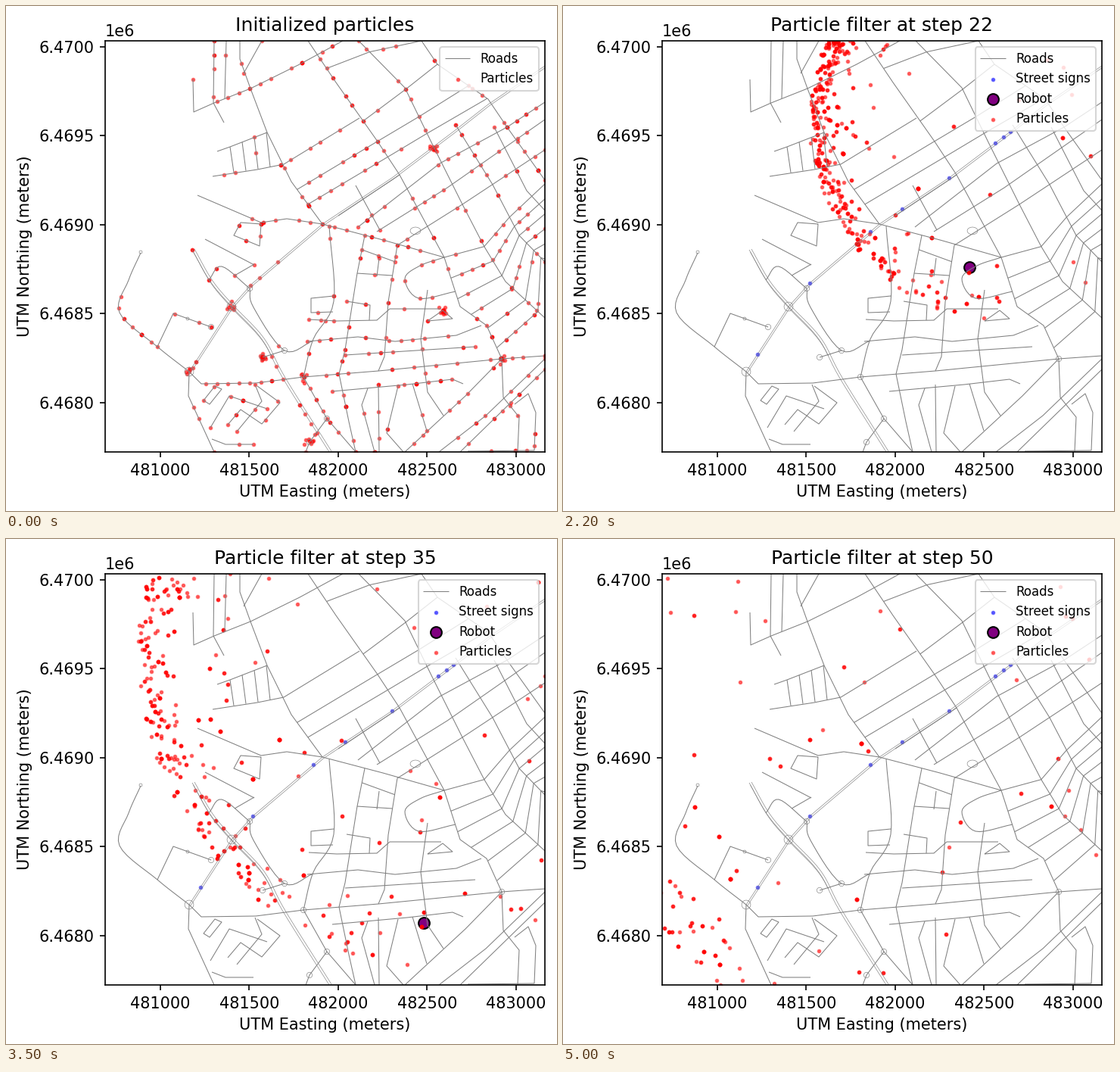
A matplotlib script for the animation above (5100 ms loop, 728x667 px).

```python
import numpy as np
import matplotlib.pyplot as plt
from matplotlib.animation import FuncAnimation
from matplotlib.collections import LineCollection

W, H, DPI = 728, 667, 150
LEFT, RIGHT, TOP, BOTTOM = 131, 712, 46, 589
SCALE = 0.2349          # pixels per metre
STEPS = 51
SPEED = 11.6            # pixels per step
START = (586, 155)


def utm(points):
    """Stage pixels to UTM metres."""
    p = np.asarray(points, float)
    return np.column_stack([481000 + (p[:, 0] - 204) / SCALE,
                            6470000 - (p[:, 1] - 54) / SCALE])


def at(road, t):
    """Points at the fractions t of a road's length."""
    p = np.asarray(road, float)
    s = np.append(0, np.cumsum(np.hypot(*np.diff(p, axis=0).T)))
    t = np.asarray(t) * s[-1]
    return np.column_stack([np.interp(t, s, p[:, 0]), np.interp(t, s, p[:, 1])])


def links(a, b, ta, tb):
    """Straight streets between matching fractions of two roads."""
    return list(np.stack([at(a, ta), at(b, tb)], axis=1))


def bend(*points):
    """Smooth curve through the points (Catmull-Rom)."""
    p = np.array(points, float)
    p = np.vstack([2 * p[0] - p[1], p, 2 * p[-1] - p[-2]])
    u = np.linspace(0, 1, 8)[:, None]
    return np.vstack([b + u * (c - a) / 2 + u**2 * (a - 2.5 * b + 2 * c - d / 2)
                      + u**3 * (1.5 * (b - c) + (d - a) / 2)
                      for a, b, c, d in zip(p, p[1:], p[2:], p[3:])])


def ring(center, r):
    a = np.linspace(0, 2 * np.pi, 17)
    return np.column_stack([center[0] + r * np.cos(a), center[1] + r * np.sin(a)])


# Junctions
circus, star, slip, mouth, elbow = (242, 483), (298, 397), (322, 373), (271, 424), (368, 455)
spur, gate, fork, foot, corner = (339, 464), (393, 490), (424, 545), (401, 576), (655, 466)
hill, brook, ridge = (418, 288), (579, 332), (323, 109)

# Through roads
trunk = [circus, star, (326, 366), hill, (510, 227), (591, 166), (637, 130), (712, 79)]
highway = bend((246, 322), (270, 364), star, (338, 440), (366, 492), (427, 589))
diag_a = [(309, 46), (309, 70), ridge, (345, 167), (377, 232), hill]
diag_b = [(399, 46), (436, 101), (491, 179), (520, 223), brook]
diag_c = [(466, 46), (527, 108), (562, 180), (603, 262), (632, 318), (660, 364), (712, 412)]
diag_d = [(549, 46), (570, 77), (637, 123), (662, 160), (712, 230)]
diag_e = [brook, (600, 397), (635, 422), corner]
arc_f = [(594, 157), (643, 236), (678, 303), (712, 338)]
arc_g = [(645, 160), (688, 244), (712, 270)]
cross = [hill, (498, 309), brook]
south_road = [circus, (258, 499), (330, 498), gate, (492, 482), corner, (712, 462)]
col_a = bend((427, 291), (433, 390), (406, 440), gate)
col_b = [(474, 303), (464, 353), (448, 454), (440, 486), (453, 549), (462, 589)]
col_c = [(517, 316), (505, 391), (500, 463), (492, 482)]
col_d = [(557, 375), (548, 440), (557, 510), (578, 541)]
streets = [diag_a, diag_b, diag_c, diag_d, diag_e, arc_f, arc_g, cross,
           south_road, col_a, col_b, col_c, col_d]

# North west
streets += [[(247, 97), (248, 140), (275, 128), ridge, (388, 77), (445, 46)],
            [(275, 46), (274, 128), (288, 154)], [(291, 46), (289, 122)],
            [(338, 46), (314, 89)],
            [(273, 225), (332, 216), (367, 209), (467, 148)],
            [(279, 192), (296, 186), (345, 167)]]
streets += [[(x, 186 - .4 * (x - 296)), (x + 5, 220 - .15 * (x - 296))]
            for x in range(296, 345, 16)]

# North: side streets between the diagonals
streets += links(diag_a, diag_b, [.79, .88], [.477, .55])
streets += links(diag_b, diag_c, [.13, .38, .477, .55], [.046, .2, .29, .345])
streets += links(diag_c, diag_d, [.046, .2, .29, .345], [0, .15, .35, .47])
streets += [[(465, 292), (573, 208), (662, 160), (712, 127)],
            [(490, 298), (583, 240), (712, 150)],
            [(517, 316), (603, 262), (712, 190)],
            [(439, 277), (520, 223)], [(462, 237), (494, 296)]]

# East: spokes across the arcs
t = np.linspace(0, .9, 6)
edge = [(712, 235), (712, 345)]
streets += list(np.stack([at(diag_e, t), at(diag_c, .72 + .28 * t),
                          at(arc_f, .65 + .35 * t), at(edge, t)], axis=1))
streets += [bend(brook, (547, 343), (527, 360), (545, 386), (594, 377)),
            [(557, 416), (577, 402), (590, 413), (557, 416)]]

# West
streets += [[(253, 250), (337, 286), (371, 281), hill],
            [(337, 288), (310, 286), (301, 303), (335, 317), (337, 288)],
            [(263, 308), (328, 342)],
            bend((178, 326), (162, 362), (150, 405), (200, 450), circus),
            [(200, 450), (221, 406), mouth],
            bend((268, 362), (285, 344), slip), [(302, 356), (328, 341)],
            bend(slip, (327, 398), elbow, (406, 442)), [elbow, spur]]

# South west
streets += [[circus, (241, 515), (275, 589)],
            [(261, 521), (276, 502), (285, 506), (269, 526), (261, 521)],
            [(270, 557), (295, 515), (345, 532)],
            [(272, 572), (290, 579), (327, 579)],
            [(293, 553), (310, 533), (338, 552), (362, 524), (332, 502)],
            [(305, 562), (338, 522), (329, 500)],
            [gate, fork, (462, 589)], [fork, foot, (396, 589)]]

# Centre
streets += links(col_b, col_c, [.066, .175], [.13, .24])
streets += [[(433, 383), (403, 386), (403, 405), (432, 404)],
            [(400, 414), (437, 416), (490, 415), (507, 400), (575, 400)],
            [(398, 443), (465, 437), (514, 443), (595, 435), (628, 422)],
            [(448, 461), (620, 450)],
            [(493, 333), (490, 357)], [(450, 390), (481, 395), (480, 415)],
            [(431, 509), (530, 500), (590, 493), (604, 499)]]

# South
streets += [[(478, 505), (470, 527), (487, 589)], [(492, 500), (493, 589)],
            [(518, 502), (503, 564), (525, 589)], [(537, 499), (556, 561)],
            [(527, 589), (607, 515), corner], [(572, 589), (634, 541), (712, 466)],
            [(600, 589), (712, 480)], [corner, (657, 517), (678, 543), (676, 589)],
            [(672, 526), (690, 512), (700, 537), (698, 587), (610, 588)]]

hubs = [circus, star, slip, mouth, elbow, spur, gate, fork, foot, corner]
main_roads = [trunk, np.add(trunk, (1.5, 1.8)), highway, highway + (3, -1),
              highway[:28] + (1.5, 3)]
main_roads += [ring(h, 6 if h in (circus, star) else 3.7) for h in hubs]
main_roads += [ring((178, 325), 2), ring((240, 413), 2),
               ring((541, 297), 7) * (1, .7) + (0, 89)]

signs = at(trunk, [.044, .231, .399, .48, .6, .722, .744, .762])

# Robot way points: step, x, y
route = np.array([(0, 590, 166), (7, 519, 222), (14, 555, 295), (18, 517, 320),
                  (20, 513, 341), (22, 537, 345), (24, 549, 369), (30, 548, 440),
                  (39, 556, 561), (42, 559, 602)])

rng = np.random.default_rng(7)


def road_nodes():
    """Points about 14 pixels apart along every road."""
    nodes = []
    for road in streets + [trunk[:4], highway]:
        length = np.hypot(*np.diff(road, axis=0).T).sum()
        nodes.append(at(road, np.linspace(0, 1, max(2, int(length / 14)))))
    return np.vstack(nodes)


def first_cloud():
    """Particles on road nodes, thicker around the big junctions."""
    nodes = road_nodes()
    busy = np.array([star, circus, corner, foot, spur, gate, (578, 405), (565, 187)])
    near = busy[rng.integers(0, len(busy), 60)] + rng.normal(0, 3.5, (60, 2))
    return np.vstack([nodes[rng.integers(0, len(nodes), 450)], near])


def spread():
    """Particles leave the start with wandering headings; some are duplicates."""
    n = 700
    angle = np.interp(rng.random(n), [0, .07, .12, .23, .52, .80, .93, .98, 1],
                      [0, 60, 110, 134, 162, 198, 230, 255, 360])
    wander = rng.exponential(.13, n) * rng.normal(0, 1, (STEPS, n))
    heading = np.radians(angle) + np.cumsum(wander, axis=0)
    move = SPEED * np.stack([np.cos(heading), -np.sin(heading)], axis=-1)
    move *= rng.uniform(.94, 1.02, (1, n, 1))
    track = np.cumsum(move, axis=0) + START + rng.normal(0, 2, (n, 2))
    return track[:, rng.integers(0, n, 1000)]


initial = first_cloud()
tracks = spread()

fig = plt.figure(figsize=(W / DPI, H / DPI), dpi=DPI)
ax = fig.add_axes([LEFT / W, 1 - BOTTOM / H, (RIGHT - LEFT) / W, (BOTTOM - TOP) / H])
(x0, y0), (x1, y1) = utm([(LEFT, BOTTOM), (RIGHT, TOP)])
ax.set_xticks(range(481000, 483001, 500))
ax.set_yticks(range(6468000, 6470001, 500))
ax.set_xlabel("UTM Easting (meters)")
ax.set_ylabel("UTM Northing (meters)")
title = ax.set_title("Initialized particles")

roads = LineCollection([utm(r) for r in streets], colors="gray", linewidths=.5, label="Roads")
ax.add_collection(roads)
ax.add_collection(LineCollection([utm(r) for r in main_roads], colors="gray", linewidths=.3))
sign_dots = ax.scatter(*utm(signs).T, s=3, color="blue", alpha=.5, label="Street signs")
robot = ax.scatter(*utm(route[:1, 1:]).T, s=50, color="purple", edgecolors="black",
                   linewidths=1, label="Robot")
particles = ax.scatter(*utm(initial).T, s=3, color="red", alpha=.5, label="Particles")
ax.set_xlim(x0, x1)
ax.set_ylim(y0, y1)

first_legend = ax.legend(handles=[roads, particles], loc="upper right", fontsize=8)
ax.add_artist(first_legend)
full_legend = ax.legend(handles=[roads, sign_dots, robot, particles],
                        loc="upper right", fontsize=8)


def draw(step):
    running = step > 0
    title.set_text(f"Particle filter at step {step}" if running else "Initialized particles")
    first_legend.set_visible(not running)
    for artist in (full_legend, sign_dots, robot):
        artist.set_visible(running)
    particles.set_offsets(utm(tracks[step - 1] if running else initial))
    steps, xs, ys = route.T
    robot.set_offsets(utm([(np.interp(step, steps, xs), np.interp(step, steps, ys))]))
    return title, particles, robot


anim = FuncAnimation(fig, draw, frames=STEPS, interval=100, repeat=True)
plt.show()
```
